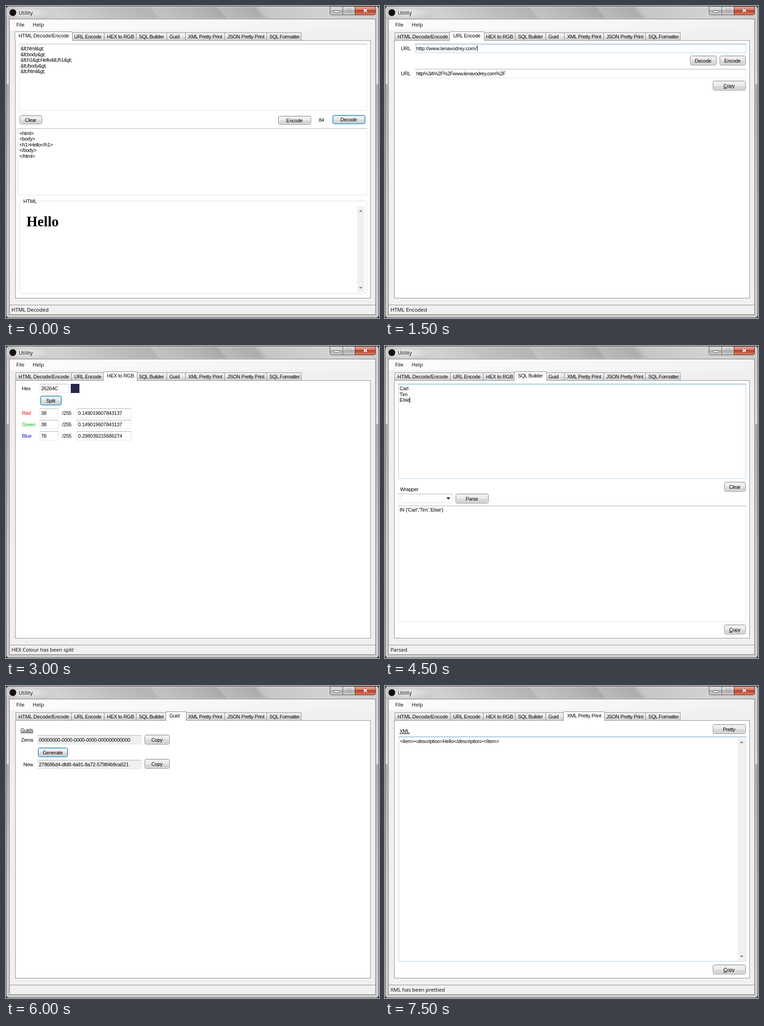
These frames come from a looping animation (818 by 684 pixels, 8 s). An HTML page:

```html
<!DOCTYPE html>
<html lang="en">
<head>
<meta charset="utf-8">
<title>Utility</title>
<style>
html, body { margin: 0; width: 100%; height: 100%; overflow: hidden; background: #333; }
svg { display: block; width: 818px; height: 684px; }
text { font: 11px "Liberation Sans", Arial, sans-serif; letter-spacing: -.25px; fill: #000; white-space: pre; }
.ui { font: 11.5px "Open Sans", "Noto Sans", sans-serif; letter-spacing: -.05px; }
.heading { font: bold 31px "Liberation Serif", "Times New Roman", serif; letter-spacing: 0; }
.mid { text-anchor: middle; }
.under { text-decoration: underline; }
.page { visibility: hidden; animation: show 8s step-end infinite; }
.page:last-child { animation-name: show-last; }
@keyframes show { 0% { visibility: visible; } 18.75%, 100% { visibility: hidden; } }
@keyframes show-last { 0% { visibility: visible; } 6.25%, 100% { visibility: hidden; } }
</style>
</head>
<body>
<svg viewBox="0 0 818 684">
  <defs>
    <linearGradient id="glass" gradientUnits="userSpaceOnUse" x1="0" x2="818" gradientTransform="skewX(38)">
      <stop offset="0" stop-color="#bcbcbc"/><stop offset=".12" stop-color="#d2d2d2"/>
      <stop offset=".28" stop-color="#bebebe"/><stop offset=".38" stop-color="#b4b4b4"/>
      <stop offset=".39" stop-color="#c2c2c2"/><stop offset=".5" stop-color="#b5b5b5"/>
      <stop offset=".56" stop-color="#aaa"/><stop offset=".57" stop-color="#bababa"/>
      <stop offset=".66" stop-color="#adadad"/><stop offset=".68" stop-color="#c6c6c6"/>
      <stop offset=".85" stop-color="#d2d2d2"/><stop offset="1" stop-color="#cacaca"/>
    </linearGradient>
    <linearGradient id="side" x2="0" y2="1">
      <stop offset="0" stop-color="#c6c6c6"/><stop offset=".25" stop-color="#d8d8d8"/>
      <stop offset=".251" stop-color="#a2a2a2"/><stop offset=".65" stop-color="#c2c2c2"/>
      <stop offset="1" stop-color="#c8c8c8"/>
    </linearGradient>
    <linearGradient id="menu"><stop offset="0" stop-color="#fcfcfc"/><stop offset="1" stop-color="#f2f2f2"/></linearGradient>
    <linearGradient id="button" x2="0" y2="1">
      <stop offset="0" stop-color="#f2f2f2"/><stop offset=".5" stop-color="#ebebeb"/>
      <stop offset=".5" stop-color="#ddd"/><stop offset="1" stop-color="#cfcfcf"/>
    </linearGradient>
    <linearGradient id="tab" x2="0" y2="1">
      <stop offset="0" stop-color="#f2f2f2"/><stop offset=".5" stop-color="#ebebeb"/>
      <stop offset=".5" stop-color="#ddd"/><stop offset="1" stop-color="#d2d2d2"/>
    </linearGradient>
    <linearGradient id="caption" x2="0" y2="1">
      <stop offset="0" stop-color="#e4e4e4"/><stop offset=".45" stop-color="#cfcfcf"/>
      <stop offset=".45" stop-color="#acacac"/><stop offset="1" stop-color="#cdcdcd"/>
    </linearGradient>
    <linearGradient id="close" x2="0" y2="1">
      <stop offset="0" stop-color="#e8b0a4"/><stop offset=".45" stop-color="#d0705f"/>
      <stop offset=".45" stop-color="#b83a25"/><stop offset="1" stop-color="#d88468"/>
    </linearGradient>
    <radialGradient id="glow"><stop offset="0" stop-color="#fff" stop-opacity=".75"/><stop offset="1" stop-color="#fff" stop-opacity="0"/></radialGradient>
  </defs>

  <rect x=".5" y=".5" width="817" height="683" rx="6" fill="url(#side)" stroke="#2c2c2c"/>
  <path d="M1 29V7Q1 1 7 1H811Q817 1 817 7V29Z" fill="url(#glass)"/>
  <rect x="1.5" y="1.5" width="815" height="681" rx="5" fill="none" stroke="#fff" stroke-opacity=".65"/>
  <ellipse cx="42" cy="15" rx="58" ry="16" fill="url(#glow)"/>
  <rect x="6.5" y="27.5" width="805" height="650" rx="1" fill="none" stroke="#e6e6e6"/>
  <rect x="7.5" y="28.5" width="803" height="648" fill="#f0f0f0" stroke="#5e5e5e"/>
  <rect x="8" y="29" width="802" height="24" fill="url(#menu)"/>
  <path d="M8 655.5H810" stroke="#8c8c8c"/>
  <circle cx="15" cy="14.5" r="7.5" fill="#111"/>
  <text class="ui" x="28" y="19">Utility</text>
  <text class="ui" x="22.5" y="45">File</text>
  <text class="ui" x="58.5" y="45">Help</text>

  <g stroke="#565656">
    <path d="M710.5 1V15Q710.5 19.5 715 19.5H738.5V1Z" fill="url(#caption)"/>
    <path d="M738.5 1H765.5V19.5H738.5Z" fill="url(#caption)"/>
    <path d="M765.5 1H810.5V15Q810.5 19.5 806 19.5H765.5Z" fill="url(#close)" stroke="#5a2520"/>
    <rect x="719.5" y="10.5" width="11" height="4" rx="1" fill="#fff"/>
    <rect x="747.5" y="6.5" width="9" height="7" fill="none" stroke="#a3a3a3"/>
  </g>
  <path d="M784.5 6.5L791.5 13M791.5 6.5L784.5 13" stroke="#6b3430" stroke-width="4.2"/>
  <path d="M784.5 6.5L791.5 13M791.5 6.5L784.5 13" stroke="#fff" stroke-width="2.6"/>
  <g id="pages"></g>
</svg>

<script>
const tabs = [
  ["HTML Decode/Encode", 22, 144, 0], ["URL Encode", 144, 216, -.22], ["HEX to RGB", 216, 286, -.25],
  ["SQL Builder", 286, 353, -.4], ["Guid", 353, 394, -.3], ["XML Pretty Print", 394, 480, -.33],
  ["JSON Pretty Print", 480, 572, -.35], ["SQL Formatter", 572, 648, -.45]
];

const escape = s => s.replace(/&/g, "&amp;").replace(/</g, "&lt;");

function text(x, y, label, { cls = "", fill, gap } = {}) {
  const style = (fill ? `fill:${fill};` : "") + (gap !== undefined ? `letter-spacing:${gap}px` : "");
  return `<text x="${x}" y="${y}" class="${cls}" style="${style}">${escape(label)}</text>`;
}

const lines = (x, y, rows, gap) =>
  rows.map((row, i) => text(x, y + i * 12.6, row, { gap })).join("");

// All boxes take left, top, right and bottom edges.
const rect = (l, t, r, b, attrs) =>
  `<rect x="${l + .5}" y="${t + .5}" width="${r - l - 1}" height="${b - t - 1}" ${attrs}/>`;

function field(l, t, r, b, { focus, fill = "#fff" } = {}) {
  const [edge, top] = focus ? ["#b0d2e8", "#5d92b8"] : ["#e0e3e8", "#abadb3"];
  return rect(l, t, r, b, `fill="${fill}" stroke="${edge}"`) +
    `<path d="M${l} ${t + .5}H${r}" stroke="${top}"/>`;
}

function button(l, t, r, b, label, { focus, key } = {}) {
  const mid = (l + r) / 2 - .5, base = Math.round((t + b) / 2) + 4;
  const content = key ? `<tspan class="under">${label[0]}</tspan>${label.slice(1)}` : label;
  return rect(l, t, r, b, `rx="3" fill="url(#button)" stroke="${focus ? "#3c7fb1" : "#707070"}"`) +
    rect(l + 1, t + 1, r - 1, b - 1, `rx="2" fill="none" stroke="${focus ? "#55c9ee" : "#fafafa"}"`) +
    `<text class="mid" x="${mid}" y="${base}">${content}</text>`;
}

const caret = (x, y) => `<path d="M${x + .5} ${y}v13" stroke="#000"/>`;

function scrollbar(l, t, b) {
  const x = l + 8;
  return `<rect x="${l}" y="${t}" width="16" height="${b - t}" fill="#f0f0f0"/>
    <path d="M${x - 4} ${t + 11}h8l-4 -4zM${x - 4} ${b - 11}h8l-4 4z" fill="#858585"/>`;
}

function tab([label, l, r, gap], active) {
  const grow = active ? 2 : 0;
  const left = l - grow - .5, right = r + grow - .5, top = 58.5 - grow;
  return `<path d="M${left} 76V${top}H${right}V76" fill="${active ? "#fff" : "url(#tab)"}" stroke="#898c95"/>` +
    text(l + 5.5, active ? 69 : 71, label, { gap });
}

function page(index, status, body) {
  const idle = tabs.filter((_, i) => i !== index).map(t => tab(t)).join("");
  return `<g class="page" style="animation-delay:${index * 1.5}s">${idle}
    ${rect(20, 75, 800, 641, 'fill="#fff" stroke="#898c95"')}
    ${tab(tabs[index], true)}${body}
    ${text(12, 670, status, { cls: "ui" })}</g>`;
}

const channel = (y, name, fill, value, ratio) =>
  text(35, y + 14, name, { fill }) + field(74, y, 115, y + 20) + text(77, y + 14, value) +
  text(123, y + 14, "/255") + field(155, y, 275, y + 20) + text(158, y + 14, ratio);

const htmlPage =
  field(29, 83, 792, 230) +
  lines(32, 97, ["&lt;html&gt;", "&lt;body&gt;", "&lt;h1&gt;Hello&lt;/h1&gt;", "&lt;/body&gt;", "&lt;/html&gt;"], -.42) +
  button(30, 240, 79, 259, "Clear") + button(597, 241, 669, 260, "Encode") +
  text(686, 254, "84") + button(716, 239, 788, 259, "Decode", { focus: true }) +
  field(26, 268, 792, 415) +
  lines(29.5, 282.5, ["<html>", "<body>", "<h1>Hello</h1>", "</body>", "</html>"], -.4) +
  rect(29, 427, 792, 631, 'rx="3" fill="none" stroke="#d5dfe5"') +
  '<rect x="36" y="425" width="34" height="5" fill="#fff"/>' + text(38, 432, "HTML", { gap: -.1 }) +
  text(45, 483, "Hello", { cls: "heading" }) + scrollbar(770, 440, 627);

const urlPage =
  text(35, 97, "URL") + field(66, 83, 792, 103, { focus: true }) +
  text(68.5, 97, "http://www.lenavodrey.com/", { gap: -.05 }) + caret(202, 86) +
  button(669, 109, 727, 130, "Decode") + button(734, 109, 791, 130, "Encode") +
  text(35, 152, "URL") + field(66, 138, 792, 158) +
  text(68.5, 152, "http%3A%2F%2Fwww.lenavodrey.com%2F", { gap: -.5 }) +
  button(719, 164, 791, 185, "Copy", { key: true });

const hexPage =
  text(35, 97, "Hex") + field(74, 83, 137, 103) + text(77, 97, "26264C") +
  '<rect x="142" y="83" width="19" height="20" fill="#26264c"/>' +
  button(75, 109, 122, 130, "Split", { focus: true }) +
  channel(137, "Red", "#e81010", "38", "0.149019607843137") +
  channel(162, "Green", "#0ab40a", "38", "0.149019607843137") +
  channel(187, "Blue", "#1010c8", "76", "0.298039215686274");

const sqlPage =
  field(29, 83, 792, 291, { focus: true }) +
  lines(32, 97, ["Carl", "Tim", "Elsie"], -.2) + caret(54, 112) +
  button(744, 298, 791, 319, "Clear") + text(33, 318, "Wrapper") +
  field(29, 324, 148, 344) + text(32, 338, "'", { fill: "#c87820" }) +
  '<path d="M135 332h8l-4 4.5z"/>' + button(155, 324, 227, 345, "Parse") +
  field(29, 350, 792, 604) + text(32, 363, "IN ('Carl','Tim','Elsie')") +
  button(744, 611, 791, 632, "Copy", { key: true });

const guidPage =
  text(32, 101, "Guids", { cls: "under" }) + text(33, 122, "Zeros") +
  field(69, 108, 297, 128, { fill: "#f0f0f0" }) +
  text(72, 122, "00000000-0000-0000-0000-000000000000", { gap: -.28 }) +
  button(304, 107, 359, 128, "Copy") + button(70, 135, 136, 156, "Generate", { focus: true }) +
  text(38, 176, "New") + field(69, 162, 297, 182, { fill: "#f0f0f0" }) +
  text(72, 176, "278686d4-dfd8-4a91-8a72-57984b9ca521", { gap: -.27 }) +
  button(304, 160, 359, 181, "Copy");

const xmlPage =
  text(32, 103, "XML", { cls: "under" }) + button(719, 84, 791, 105, "Pretty") +
  field(30, 111, 792, 604, { focus: true }) +
  text(33, 125, "<item><description>Hello</description></item>", { gap: -.3 }) +
  scrollbar(774, 114, 602) + button(719, 611, 791, 632, "Copy", { key: true });

document.getElementById("pages").innerHTML = [
  ["HTML Decoded", htmlPage], ["HTML Encoded", urlPage], ["HEX Colour has been split", hexPage],
  ["Parsed", sqlPage], ["", guidPage], ["XML has been prettied", xmlPage]
].map(([status, body], i) => page(i, status, body)).join("");
</script>
</body>
</html>
```
